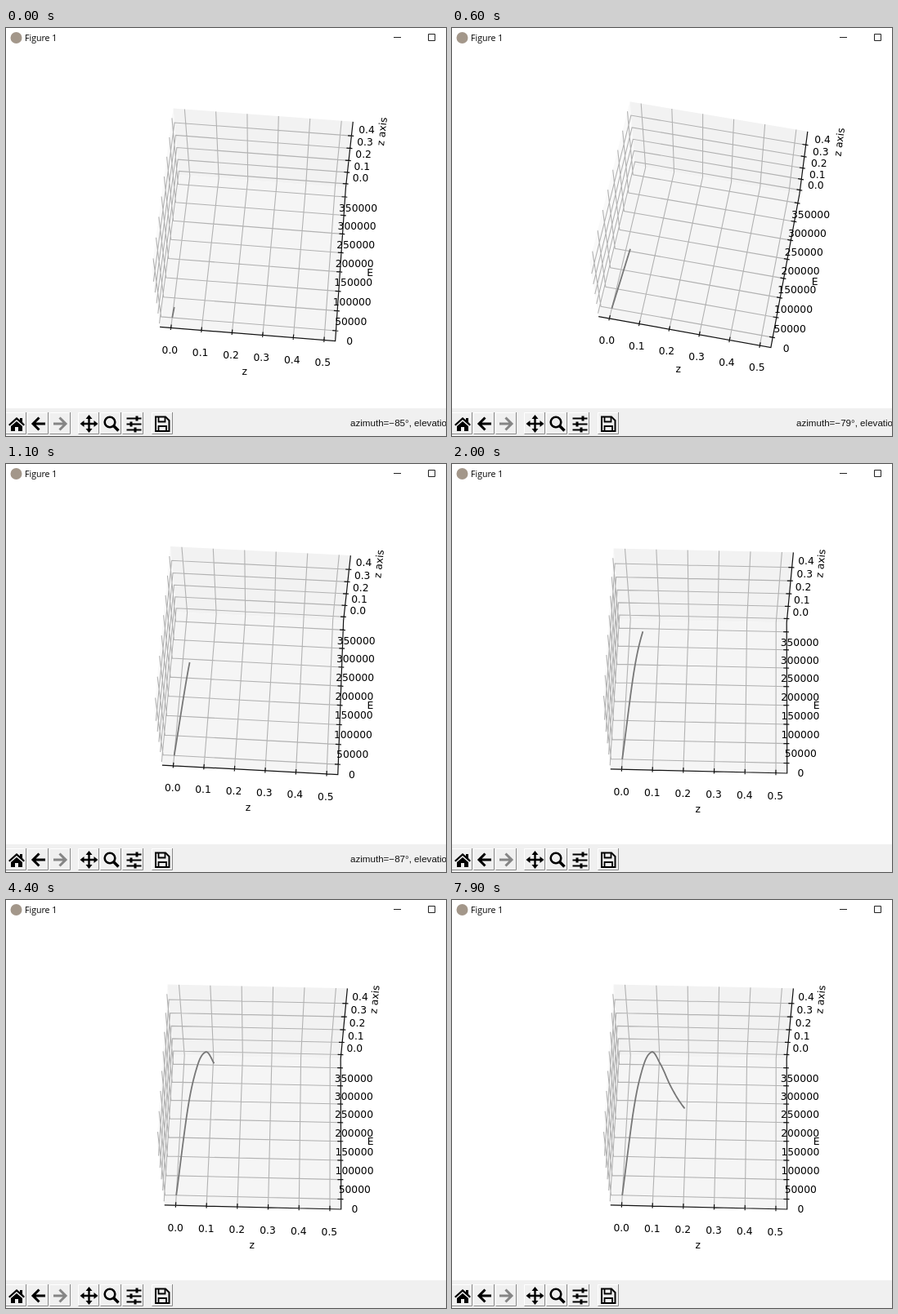
Animation, 538 px wide and 500 px high, one loop 8 s. Source, as an HTML page:

```html
<!DOCTYPE html>
<html lang="en">
<head>
<meta charset="utf-8">
<title>Figure 1</title>
<style>
  html, body { margin: 0; width: 100%; height: 100%; overflow: hidden; background: #fff; }
  svg { display: block; }
  .plot { font: 12.3px "DejaVu Sans", sans-serif; text-anchor: middle; }
  .grid { fill: none; stroke: #b2b2b2; stroke-width: 1.1; }
  .axis { fill: none; stroke: #111; stroke-width: 1.2; }
  .curve { fill: none; stroke: #777; stroke-width: 1.8; stroke-linejoin: round; }
  .title { font: 10.6px "Open Sans", sans-serif; }
  .status { font: 11.6px "Liberation Sans", Arial, sans-serif; fill: #111; }
  .icon { fill: none; stroke: #000; stroke-width: 3; }
</style>
</head>
<body>
<svg width="538" height="500" viewBox="0 0 538 500">
  <rect width="538" height="500" fill="#fff"/>
  <circle cx="12.5" cy="12" r="7" fill="#a3978a"/>
  <text class="title" x="23" y="16">Figure 1</text>
  <path d="M474 11.5h9M516.5 7.5h8v8h-8z" fill="none" stroke="#222"/>

  <g id="plot" class="plot"></g>

  <rect y="466" width="538" height="34" fill="#f0f0f0"/>
  <g id="buttons"></g>
  <g transform="translate(13 485)">
    <path d="M-10 1L0-8 4-4.500V-7H7V-2L10 1 8.500 2.500 0-5-8.500 2.500ZM-7 3L0-3 7 3V9H2V4H-2V9H-7Z"/>
  </g>
  <path class="icon" d="M48 485H34M40.500 477.500L33 485l7.500 7.500"/>
  <path class="icon" style="stroke:#858585" d="M58 485H72M65.500 477.500L73 485l-7.500 7.500"/>
  <g transform="translate(101.500 485)">
    <path class="icon" style="stroke-width:2.400" d="M-8 0H8M0-8V8"/>
    <path d="M0-11l4 5h-8zM0 11l4-5h-8zM-11 0l5-4v8zM11 0l-5-4v8z"/>
  </g>
  <circle class="icon" cx="127" cy="483" r="6.300" style="stroke-width:2.600"/>
  <path class="icon" style="stroke-width:3.600" d="M131.500 487.500l6 6"/>
  <path class="icon" style="stroke-width:1.800" d="M147.500 478.500h18M147.500 485.500h18M147.500 492.500h18"/>
  <path class="icon" d="M160 475.500v6M153 482.500v6M158 489.500v6"/>
  <path class="icon" style="stroke-width:2" d="M183 476.500h12l4.500 4.500v13h-16.500z"/>
  <path class="icon" style="stroke-width:1.800" d="M186.500 477v5.500h8V477M186.500 494v-6h9.500v6"/>
  <text id="status" class="status" x="421" y="488"></text>
</svg>

<script>
const LOOP = 8000, STEP = 100;
const SCALE = 1831, CX = 304.5, CY = 242.4, DIST = 10;
const BOX = [1.1905, 1.1905, 0.8929];
const LABEL = 0.081, NAME = 0.181;   // outward offsets, as shares of the box
const PAD = 0.0636, SPAN = 0.8728;   // where the data sit inside the box

// time, azimuth, elevation
const POSES = [[0, -85, 62.3], [600, -79, 64], [900, -85.7, 64.2], [1500, -88.5, 60]];
// time, x reached by the line
const TIPS = [[0, 0.0025], [600, 0.014], [900, 0.0188], [2000, 0.0447],
  [4400, 0.103], [6000, 0.1428], [7900, 0.193]];
// x, E in units of 50000
const KNOTS = [[0, 0], [0.0218, 4.58], [0.0447, 6.84], [0.072, 7.72],
  [0.103, 7.09], [0.1428, 5.83], [0.172, 5.07], [0.193, 4.63], [0.21, 4.32]];

const xAt = v => PAD + v / 0.5 * SPAN;
const yAt = i => PAD + i / 7 * SPAN;
const zAt = v => PAD + v / 0.475 * SPAN;

const range = n => Array.from({ length: n }, (_, i) => i);

function lerpKeys(keys, t, col) {
  const i = keys.findIndex(k => k[0] > t);
  if (i < 0) return keys[keys.length - 1][col];
  if (i === 0) return keys[0][col];
  const a = keys[i - 1], b = keys[i];
  return a[col] + (b[col] - a[col]) * (t - a[0]) / (b[0] - a[0]);
}

function slope(i) {
  const d = j => (KNOTS[j + 1][1] - KNOTS[j][1]) / (KNOTS[j + 1][0] - KNOTS[j][0]);
  const last = KNOTS.length - 1;
  if (i === 0) return d(0);
  if (i === last) return d(last - 1);
  const h0 = KNOTS[i][0] - KNOTS[i - 1][0], h1 = KNOTS[i + 1][0] - KNOTS[i][0];
  return (d(i - 1) * h1 + d(i) * h0) / (h0 + h1);
}

// smooth curve through the knots (cubic Hermite)
function energy(x) {
  let i = 0;
  while (i < KNOTS.length - 2 && KNOTS[i + 1][0] < x) i++;
  const [x0, y0] = KNOTS[i], [x1, y1] = KNOTS[i + 1];
  const h = x1 - x0, s = (x - x0) / h, r = 1 - s;
  return y0 * r * r * (1 + 2 * s) + y1 * s * s * (3 - 2 * s)
    + h * s * r * (slope(i) * r - slope(i + 1) * s);
}

function camera(azim, elev) {
  const a = azim * Math.PI / 180, e = elev * Math.PI / 180;
  const ca = Math.cos(a), sa = Math.sin(a), ce = Math.cos(e), se = Math.sin(e);
  return p => {
    const [x, y, z] = p.map((v, i) => (v - 0.5) * BOX[i]);
    const depth = DIST - (ce * ca * x + ce * sa * y + se * z);
    const right = -sa * x + ca * y;
    const up = -se * ca * x - se * sa * y + ce * z;
    return [CX + SCALE * right / depth, CY - SCALE * up / depth];
  };
}

function drawPlot(azim, elev, tip) {
  const cam = camera(azim, elev);
  const path = pts => 'M' + pts.map(p => cam(p).map(v => v.toFixed(2)).join(' ')).join('L');
  const pane = (fill, ...pts) => `<path d="${path(pts)}Z" fill="${fill}"/>`;
  const label = (text, p, drop, turn = 0) => {
    const [x, y] = cam(p);
    return `<text transform="translate(${x.toFixed(2)} ${y.toFixed(2)}) rotate(${turn.toFixed(2)})" y="${drop}">${text}</text>`;
  };
  let grid = '', axes = '', text = '';

  for (const i of range(6)) {
    const x = xAt(i / 10);
    grid += path([[x, 0, 0], [x, 1, 0], [x, 1, 1]]);
    axes += path([[x, -0.013, 0], [x, 0.02, 0]]);
    text += label((i / 10).toFixed(1), [x, -LABEL, -LABEL], 10.4);
  }
  for (const i of range(8)) {
    const y = yAt(i);
    grid += path([[1, y, 0], [0, y, 0], [0, y, 1]]);
    axes += path([[1.013, y, 0], [0.98, y, 0]]);
    text += label(i * 50000, [1 + LABEL, y, -LABEL], 10.4);
  }
  for (const i of range(5)) {
    const z = zAt(i / 10);
    grid += path([[0, 0, z], [0, 1, z], [1, 1, z]]);
    axes += path([[1.013, 1, z], [0.98, 1, z]]);
    text += label((i / 10).toFixed(1), [1 + LABEL, 1 + LABEL, z], 10.4);
  }
  axes += path([[0, 0, 0], [1, 0, 0], [1, 1, 0], [1, 1, 1]]);

  const [bx, by] = cam([1, 1, 0]), [tx, ty] = cam([1, 1, 1]);
  const turn = Math.atan2(ty - by, tx - bx) * 180 / Math.PI;
  text += label('z', [0.5, -NAME, -NAME], 3)
    + label('E', [1 + NAME, 0.5, -NAME], 1.5)
    + label('z axis', [1 + NAME, 1 + NAME, 0.5], 4, turn);

  const n = 60;
  const line = range(n + 1).map(i => {
    const x = tip * i / n;
    return [xAt(x), yAt(energy(x)), 0];
  });

  return pane('#f9f9f9', [0, 0, 0], [0, 1, 0], [0, 1, 1], [0, 0, 1])
    + pane('#f2f2f2', [0, 1, 0], [1, 1, 0], [1, 1, 1], [0, 1, 1])
    + pane('#f5f5f5', [0, 0, 0], [1, 0, 0], [1, 1, 0], [0, 1, 0])
    + `<path class="grid" d="${grid}"/><path class="axis" d="${axes}"/>`
    + `<path class="curve" d="${path(line)}"/>` + text;
}

const el = id => document.getElementById(id);

el('buttons').innerHTML = [-1, 26, 53, 88, 115, 142, 178].map(x =>
  `<path d="M${x + 0.5} 497V471.500H${x + 26}" fill="none" stroke="#fff"/>` +
  `<path d="M${x + 0.5} 497.500H${x + 25.5}V471" fill="none" stroke="#8a8a8a"/>`).join('');

let shown = -1;
const start = performance.now();

function tick() {
  const t = Math.floor((performance.now() - start) % LOOP / STEP) * STEP;
  if (t !== shown) {
    shown = t;
    const azim = lerpKeys(POSES, t, 1), elev = lerpKeys(POSES, t, 2);
    el('plot').innerHTML = drawPlot(azim, elev, lerpKeys(TIPS, t, 1));
    el('status').textContent = t < 1900
      ? `azimuth=−${Math.round(-azim)}°, elevation=${Math.round(elev)}°` : '';
  }
  requestAnimationFrame(tick);
}
tick();
</script>
</body>
</html>
```
